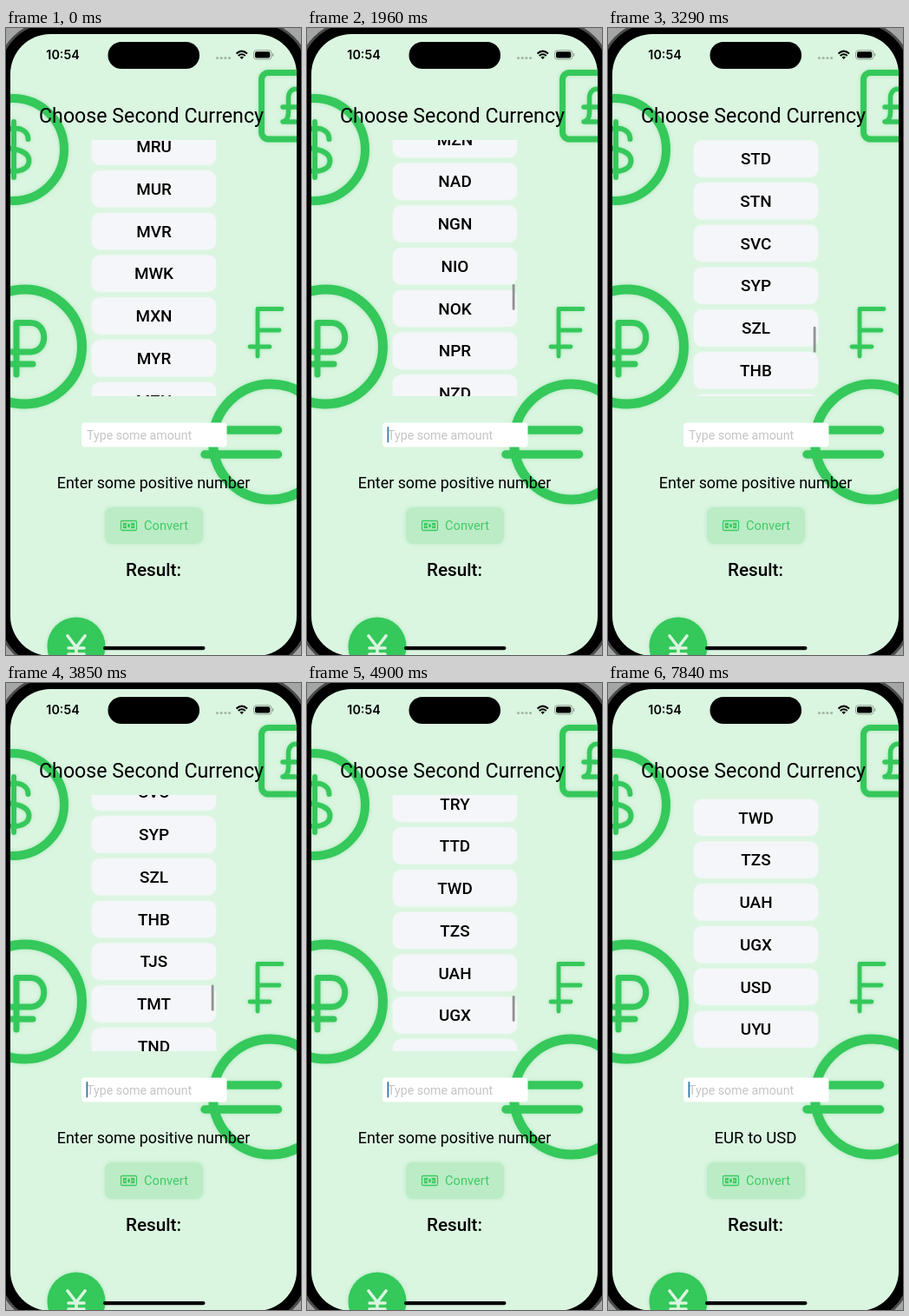
Write an HTML page that moves like this. It is 340 px wide and 722 px high and loops after 8 s.

```html
<!DOCTYPE html>
<html lang="en">
<head>
<meta charset="utf-8">
<title>Currency picker</title>
<style>
  html, body { margin: 0; width: 100%; height: 100%; overflow: hidden; background: #000; }
  svg { display: block; width: 340px; height: 722px; }
  text { font-family: Roboto, Inter, "Liberation Sans", sans-serif; text-anchor: middle; }
  .icons { fill: none; stroke: #35c85b; stroke-linecap: round; stroke-linejoin: round;
           filter: drop-shadow(0 0 2px rgba(52, 199, 89, .3)); }
  .card { fill: #f5f6f9; filter: drop-shadow(0 0 1.5px rgba(255, 255, 255, .6)); }
  .code { font-size: 18.9px; font-weight: 500; }
</style>
</head>
<body>
<svg viewBox="0 0 340 722">
  <defs>
    <clipPath id="screen"><rect x="5" y="7" width="330" height="716" rx="46"/></clipPath>
    <clipPath id="window"><rect x="92" y="129" width="156" height="295"/></clipPath>
  </defs>

  <rect width="340" height="722" fill="#a4a6a5"/>
  <rect x="-8" y="-6" width="356" height="742" rx="58" stroke="#4a4b4b" stroke-width="3"/>

  <g clip-path="url(#screen)">
    <rect x="5" y="7" width="330" height="716" fill="#daf5e0"/>
    <g class="icons">
      <g stroke-width="10">
        <circle cx="8" cy="140" r="59"/>
        <path stroke-width="6" d="M9 108V172M25.5 128C25.5 119 18 115.500 9 115.500C0 115.500-8 120-8 128C-8 136 0 138 9 139.500C18 141 26.500 144 26.500 153C26.500 161 18 165 9 165C0 165-8 161-9 152"/>
      </g>
      <g stroke-width="11">
        <circle cx="21.500" cy="367" r="66"/>
        <path stroke-width="7" d="M12 399V339.500H28C49 339.500 49 373 28 373H4M4 387H31"/>
      </g>
      <rect x="294.500" y="51.500" width="84" height="76.500" rx="8" stroke-width="7"/>
      <path stroke-width="5.500" d="M344 79C341 67 325.500 67 325.500 81V97C325.500 103 323 107 319 108H346M319 91H340"/>
      <path stroke-width="4.800" d="M318 323.500H290V378M290 348H315M281 367H304"/>
      <g stroke-width="11">
        <circle cx="305" cy="476.500" r="66.500"/>
        <path stroke-width="9.500" d="M229 463H313.500M229 491H313.500"/>
      </g>
      <circle cx="81" cy="712" r="33.500" fill="#35c85b" stroke="none"/>
      <path stroke="#daf5e0" stroke-width="3.600" d="M71 700L81 713L91 700M81 713V728M72 714H90M72 721H90"/>
    </g>

    <text x="167.500" y="109" font-size="23.200">Choose Second Currency</text>
    <g clip-path="url(#window)">
      <g id="list"></g>
      <rect id="bar" x="236.700" width="2.800" height="30" rx="1.400" fill="#8e9190"/>
    </g>

    <rect x="87" y="454.500" width="167.500" height="28" rx="4" fill="#fff"/>
    <text x="93" y="473.500" font-size="14.200" fill="#c3c4c6" style="text-anchor:start">Type some amount</text>
    <rect id="caret" x="92.500" y="459" width="1.800" height="18.500" rx=".9" fill="#2f78a8"/>

    <text id="hint" x="170" y="530"></text>

    <rect x="114" y="552" width="113" height="42" rx="8" fill="#bbecc6" style="filter:drop-shadow(0 0 2px rgba(52,199,89,.2))"/>
    <g fill="none" stroke="#3cc960" stroke-width="1.300">
      <rect x="132.500" y="567.500" width="18" height="11" rx="1.500"/>
      <rect x="134.800" y="569.800" width="13.400" height="6.400" fill="#3cc960" stroke="none"/>
      <ellipse cx="141.500" cy="573" rx="2.200" ry="3.200" stroke="#bbecc6" fill="#3cc960"/>
      <path stroke="#bbecc6" stroke-width="1" d="M137 572V574M146 572V574"/>
    </g>
    <text x="159" y="578" font-size="14.700" fill="#41ca64" style="text-anchor:start">Convert</text>
    <text x="170" y="630.500" font-size="20.700" font-weight="500">Result:</text>

    <text x="65.500" y="36" font-size="14.300" font-weight="600" style="font-family:Inter,Roboto,sans-serif">10:54</text>
    <rect x="117.500" y="16" width="105.500" height="31" rx="15.500"/>
    <g fill="#a3b7a8">
      <circle cx="243.500" cy="34.500" r="1.600"/><circle cx="248.200" cy="34.500" r="1.600"/>
      <circle cx="252.900" cy="34.500" r="1.600"/><circle cx="257.600" cy="34.500" r="1.600"/>
    </g>
    <g fill="none" stroke="#000" stroke-width="2">
      <path d="M265.500 29.500Q271.700 23.800 278 29.500M267.700 32Q271.700 28.500 275.800 32"/>
      <path d="M269.500 33.500Q271.700 31.800 274 33.500L271.700 36Z" fill="#000" stroke="none"/>
      <rect x="285.500" y="25.800" width="20.500" height="10.200" rx="3" stroke="#8fa294" stroke-width="1"/>
      <rect x="287" y="27.300" width="17.300" height="7.200" rx="1.800" fill="#000" stroke="none"/>
      <path d="M307.600 29.300V32.500" stroke="#8fa294" stroke-width="1.200"/>
    </g>
    <rect x="112" y="712" width="117.500" height="4.200" rx="2.100"/>
  </g>
</svg>

<script>
const LOOP = 8000, STEP = 70, PITCH = 48.75;
const $ = id => document.getElementById(id);
const list = $('list'), bar = $('bar'), caret = $('caret'), hint = $('hint');

const codes = ('MMK MNT MOP MRU MUR MVR MWK MXN MYR MZN NAD NGN NIO NOK NPR NZD OMR PAB PEN PGK ' +
  'PHP PKR PLN PYG QAR RON RSD RUB RWF SAR SBD SCR SDG SEK SGD SHP SLL SOS SRD SSP STD STN ' +
  'SVC SYP SZL THB TJS TMT TND TOP TRY TTD TWD TZS UAH UGX USD UYU UZS').split(' ');
const firstRow = codes.indexOf('MRU');

list.innerHTML = codes.map((code, i) => {
  const y = 136.5 + (i - firstRow) * PITCH;
  return `<g id="${code}"><rect class="card" x="99" y="${y - 21}" width="143" height="42" rx="9.5"/>` +
    `<text class="code" x="170.5" y="${y + 6.7}">${code}</text></g>`;
}).join('');
const picked = $('USD');

// time, scroll offset, speed in px per ms
const scroll = [
  [1260, 0, 0], [1470, -95.2, -.2], [1540, -100, 0], [2380, 1038, 1.6], [2940, 1789, 0],
  [3220, 1789, 0], [3290, 1789.8, .05], [4480, 2132.5, .3], [5250, 2362, 0],
  [5390, 2362, 0], [5600, 2370.2, 0]
];

const clamp = x => Math.max(0, Math.min(1, x));
const ramp = (t, from, to) => clamp((t - from) / (to - from));

function offsetAt(t) {
  const next = scroll.findIndex(k => k[0] > t);
  if (next === 0) return scroll[0][1];
  if (next < 0) return scroll[scroll.length - 1][1];
  const [t0, s0, v0] = scroll[next - 1], [t1, s1, v1] = scroll[next];
  const d = t1 - t0, u = (t - t0) / d, w = 1 - u;
  return s0 * w * w * (1 + 2 * u) + s1 * u * u * (3 - 2 * u) + d * u * w * (v0 * w - v1 * u);
}

function caretAt(t) {
  if (t < 255) return 0;
  const p = (t - 255) % 1040;
  return ramp(p, 0, 140) * (1 - ramp(p, 660, 780));
}

function draw(ms) {
  const t = Math.floor(ms / STEP) * STEP;
  const s = offsetAt(t);
  list.setAttribute('transform', `translate(0 ${-s.toFixed(2)})`);
  bar.setAttribute('y', 285.1 + s * .0327);
  bar.setAttribute('opacity', t < 1330 ? 0 : 1 - ramp(t, 7490, 7840));
  caret.setAttribute('opacity', caretAt(t));

  const press = t < 6580 ? 0 : 1 - ramp(t, 6650, 7000);
  picked.setAttribute('opacity', 1 - .7 * press);

  const chosen = t >= 6720;
  hint.textContent = chosen ? 'EUR to USD' : 'Enter some positive number';
  hint.setAttribute('font-size', chosen ? 18.6 : 17.9);
}

const start = performance.now();
function tick() {
  draw((performance.now() - start) % LOOP);
  requestAnimationFrame(tick);
}
tick();
</script>
</body>
</html>
```
